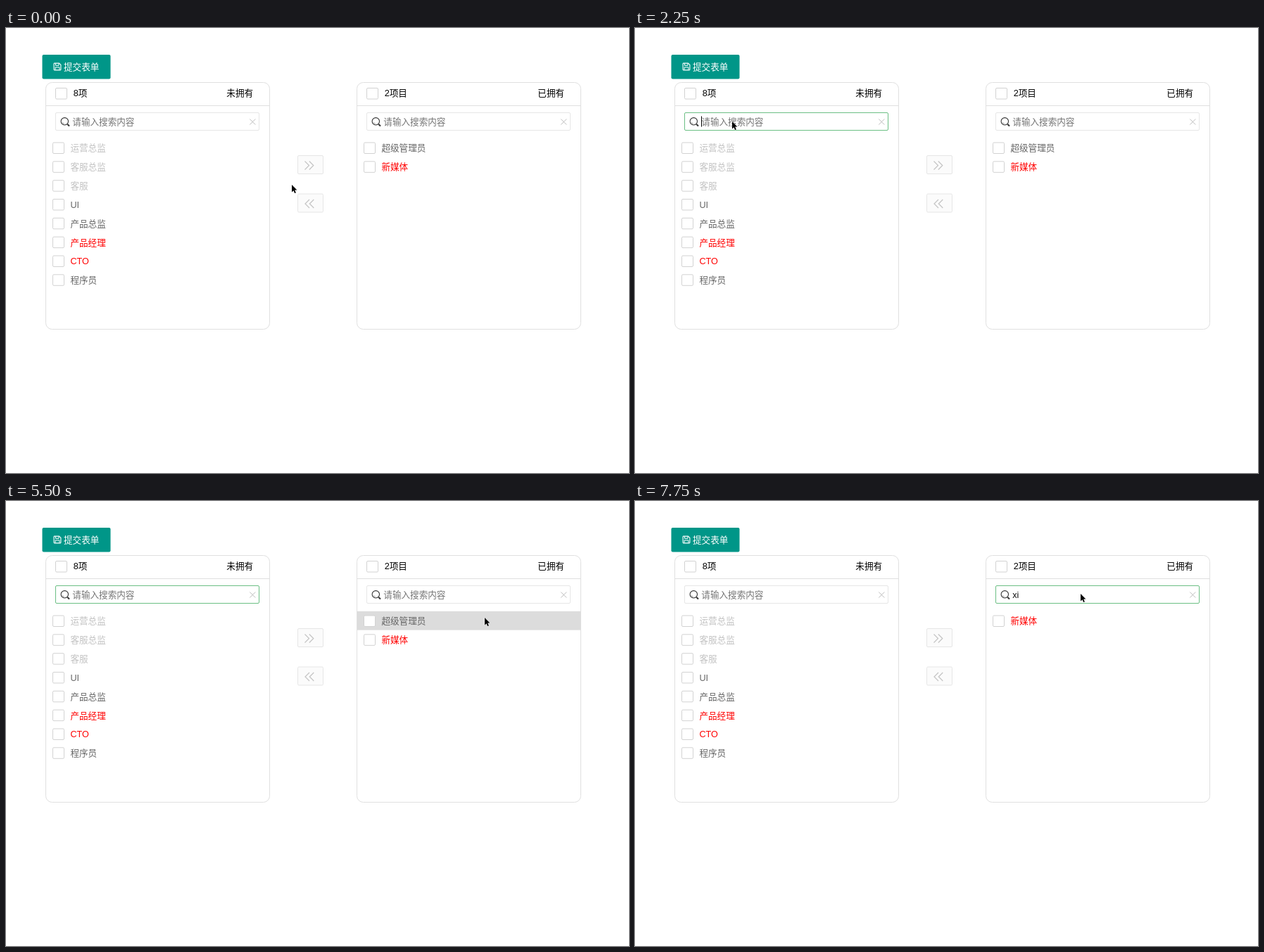
Write an HTML page that moves like this. It is 885 px wide and 633 px high and loops after 8000 ms.

```html
<!DOCTYPE html>
<html lang="zh">
<head>
<meta charset="utf-8">
<title>Transfer list</title>
<style>
  html, body { margin: 0; width: 100%; height: 100%; overflow: hidden; background: #fff; }
  svg { display: block; width: 885px; height: 633px; }
  text { font: 12.6px "Liberation Sans", "Noto Sans CJK SC", "Noto Sans CJK", sans-serif; white-space: pre; }
</style>
</head>
<body>
<svg id="stage" viewBox="0 0 885 633"></svg>
<script>
const LOOP = 8000, STEP = 250, ROW = 26.83;
const GREY = '#c2c2c2', DARK = '#666', RED = '#f00';
const stage = document.getElementById('stage');

function add(parent, tag, attrs, content) {
  const node = document.createElementNS('http://www.w3.org/2000/svg', tag);
  for (const key in attrs) node.setAttribute(key, attrs[key]);
  if (content) node.textContent = content;
  parent.appendChild(node);
  return node;
}
const group = (parent, x, y) => add(parent, 'g', { transform: `translate(${x} ${y})` });
const box = (parent, x, y, width, height, rx, stroke, fill = '#fff') =>
  add(parent, 'rect', { x, y, width, height, rx, stroke, fill });
const line = (parent, d, stroke, width = 1) =>
  add(parent, 'path', { d, stroke, fill: 'none', 'stroke-width': width });
const label = (parent, x, y, fill, content) => add(parent, 'text', { x, y, fill }, content);
const show = (node, on) => node.setAttribute('visibility', on ? 'visible' : 'hidden');

function makeSubmit() {
  const button = box(stage, 51.5, 38, 97, 34.5, 2, 'none', '#009688');
  const icon = group(stage, 67.5, 49.5);
  line(icon, 'M.6 1.4Q.6 .6 1.4 .6H8L10.4 3V9.6Q10.4 10.4 9.6 10.4H1.4Q.6 10.4 .6 9.6Z', '#fff', 1.1);
  line(icon, 'M3 .8V3.8H7.4V.8M2.6 10.2V6.4H8.4V10.2', '#fff');
  label(stage, 82, 59.8, '#fff', '提交表单');
  return button;
}

function makePanel(x, count, title, items) {
  const g = group(stage, x, 77);
  box(g, .5, .5, 318, 351, 9, '#e0e0e0');
  line(g, 'M1 33.5H318', '#e0e0e0');
  box(g, 14.5, 8.5, 16, 15.5, 1.5, '#d2d2d2');
  label(g, 39.7, 19.7, '#000', count);
  label(g, 257.3, 19.7, '#000', title);

  const field = box(g, 14.5, 43.5, 289, 25, 1.5, '#e6e6e6');
  add(g, 'circle', { cx: 27.3, cy: 55.8, r: 5.2, fill: 'none', stroke: '#333', 'stroke-width': 1.1 });
  line(g, 'M24.2 57.3Q25 59 26.8 59.2', '#777', .8);
  line(g, 'M31.2 59.8L34 62.4', '#333', 2);
  line(g, 'M290.3 52.5l8 8m0-8l-8 8', '#bdbdbd');
  const hint = label(g, 38.3, 60.8, '#757575', '请输入搜索内容');
  const input = label(g, 38.3, 60.8, '#111', '');
  const caret = add(g, 'rect', { y: 48.5, width: 1, height: 15, fill: '#000' });

  const rows = items.map(([name, color]) => {
    const row = group(g, 0, 0);
    const back = add(row, 'rect', { x: 1, width: 317, height: ROW, fill: '#dcdcdc' });
    box(row, 10.5, 6.2, 16, 15.5, 1.5, '#d2d2d2');
    label(row, 35.4, 18.6, color, name);
    return { row, back };
  });

  return function update({ text, focus, blink, keep, hover }) {
    field.setAttribute('stroke', focus ? '#6bbf84' : '#e6e6e6');
    show(hint, !text);
    input.textContent = text;
    caret.setAttribute('x', 38 + input.getComputedTextLength());
    show(caret, focus && blink);
    let place = 0;
    rows.forEach(({ row, back }, i) => {
      const visible = !keep || keep.includes(i);
      row.setAttribute('display', visible ? 'inline' : 'none');
      if (!visible) return;
      row.setAttribute('transform', `translate(0 ${79.8 + ROW * place++})`);
      back.setAttribute('opacity', i === hover ? 1 : 0);
    });
  };
}

function makeArrow(y, d) {
  const g = group(stage, 414, y);
  box(g, .5, .5, 36, 26, 1.5, '#e6e6e6', '#fbfbfb');
  line(g, d, '#c4c4c4', 1.2);
}

const submit = makeSubmit();
const updateLeft = makePanel(56, '8项', '未拥有', [
  ['运营总监', GREY], ['客服总监', GREY], ['客服', GREY], ['UI', DARK],
  ['产品总监', DARK], ['产品经理', RED], ['CTO', RED], ['程序员', DARK]
]);
const updateRight = makePanel(498, '2项目', '已拥有', [['超级管理员', DARK], ['新媒体', RED]]);
makeArrow(181, 'M10.5 8.5l6 6l-6 6m6.3-12l6 6l-6 6');
makeArrow(235.5, 'M17 8.5l-6 6l6 6m6.3-12l-6 6l6 6');
const pointer = add(stage, 'path', {
  d: 'M0 0V10.4L2.4 8.2L4.1 12L5.9 11.2L4.2 7.5H7.4Z',
  fill: '#000', stroke: '#fff', 'stroke-width': .9, 'paint-order': 'stroke'
});

// [time, x, y]
const path = [
  [0, 406, 223], [250, 405, 223], [750, 398, 216], [1000, 380, 190], [1250, 215, 95],
  [1500, 110, 61], [1750, 122, 100], [2000, 136, 131], [2250, 138, 133],
  [5250, 557, 152], [5500, 680, 166], [5750, 655, 142], [6000, 633, 132]
];

function render(time) {
  // the screen refreshes four times a second
  const t = Math.floor(time % LOOP / STEP) * STEP;
  const within = (from, to) => t >= from && t < to;

  const [, x, y] = path.filter(p => p[0] <= t).pop();
  pointer.setAttribute('transform', `translate(${x} ${y})`);
  submit.setAttribute('fill', within(1500, 1750) ? '#1ea395' : '#009688');

  updateLeft({
    text: within(3250, 5000) ? 'y' : '',
    focus: within(2250, 6000),
    blink: !within(2750, 3250) && !within(3750, 4250) && t < 5250,
    keep: within(3500, 5250) ? [0, 7] : null
  });
  updateRight({
    text: t >= 6750 ? 'xi' : t >= 6500 ? 'x' : '',
    focus: t >= 6000,
    blink: t < 7500,
    keep: t >= 7000 ? [1] : null,
    hover: within(5500, 5750) ? 0 : -1
  });
}

const start = performance.now();
function tick() {
  render(performance.now() - start);
  requestAnimationFrame(tick);
}
tick();
</script>
</body>
</html>
```
